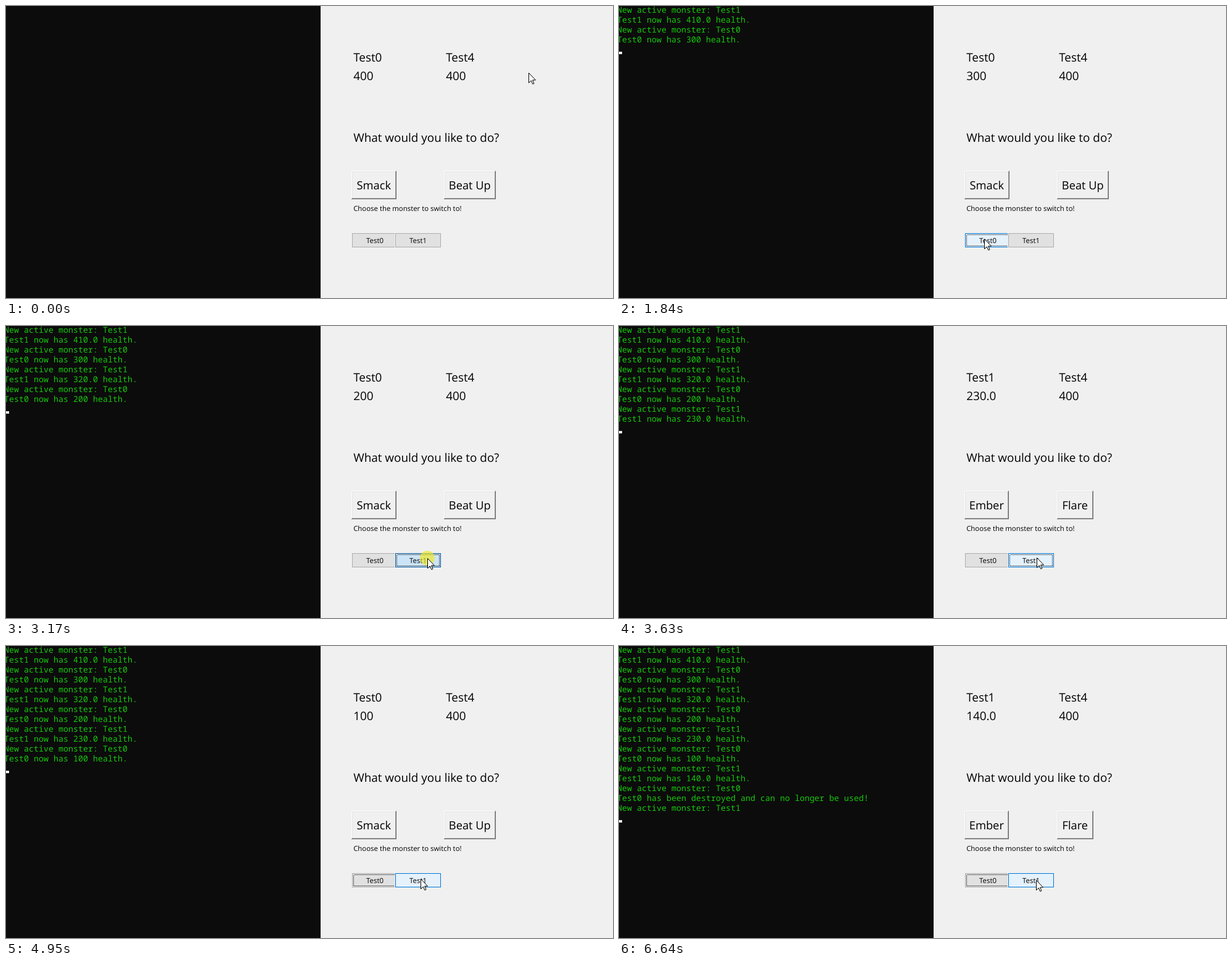
An HTML page for the animation above (8 s loop, 984 px wide and 473 px high).

```html
<!DOCTYPE html>
<html lang="en">
<head>
<meta charset="utf-8">
<title>Monster switch demo</title>
<style>
  html, body { margin: 0; width: 100%; height: 100%; overflow: hidden; background: #f0f0f0; }
  svg { display: block; width: 984px; height: 473px; }
  text { font-family: "Open Sans", "Noto Sans", sans-serif; text-rendering: geometricPrecision; white-space: pre; }
  rect { shape-rendering: crispEdges; }
  .label { font-size: 18.9px; }
  .move { font-size: 18.3px; text-anchor: middle; }
  .small { font-size: 11.4px; }
  .mid { text-anchor: middle; }
  #log text { font: 13.333px "Noto Sans Mono", "DejaVu Sans Mono", monospace; fill: #16c60c; }
  .face { fill: #e1e1e1; stroke: #adadad; }
  .hover .face { fill: #e5f1fb; stroke: #0078d7; }
  .pressed .face { fill: #cce4f7; stroke: #005499; }
  .ring { fill: none; stroke: #000; stroke-dasharray: 1; stroke-dashoffset: 1; visibility: hidden; }
  .focus .ring { visibility: visible; }
</style>
</head>
<body>
<svg viewBox="0 0 984 473">
  <rect width="984" height="473" fill="#f0f0f0"/>
  <rect width="510" height="473" fill="#0c0c0c"/>
  <g id="log"></g>
  <rect id="caret" width="5" height="4" fill="#f2f2f2"/>

  <text class="label" id="name" x="563.2" y="90"></text>
  <text class="label" id="hp" x="563.2" y="120"></text>
  <text class="label" x="713.2" y="90">Test4</text>
  <text class="label" x="713.2" y="120">400</text>
  <text class="label" x="563.2" y="220">What would you like to do?</text>
  <g id="moves"></g>
  <text class="small" x="563.2" y="332">Choose the monster to switch to!</text>
  <g id="switches"></g>

  <g id="mouse">
    <circle id="glow" r="12" fill="#eee81e" fill-opacity=".65"/>
    <path d="M.5 .5V16.5L4.3 12.9L6.8 18.5L9 17.5L6.6 12H11.5Z" fill="#fff" stroke="#000"/>
  </g>
</svg>
<script>
const LOOP = 8000;
const LEAD = 150;    // pointer rests this long before a press
const LINGER = 80;   // and this long after a release
const RETREAT = 80;  // a destroyed monster is swapped out after this

// Where the pointer stops: press time, release time, x, y.
// The first and last stops are only resting places.
const stops = [
  [0, 380, 847, 108],
  [1150, 1230, 659, 388],
  [1610, 1765, 592, 377],
  [2240, 2320, 664, 376],
  [2700, 2780, 598, 376],
  [3170, 3320, 683, 376],
  [4500, 4580, 625, 370],
  [5100, 5180, 672, 377],
  [5960, 6040, 606, 377],
  [6790, LOOP, 676, 379]
].map(([press, release, x, y]) => ({ press, release, x, y }));
const clicks = stops.slice(1, -1);

// Clicks alternate between the two monsters, each losing health per switch.
const targetOf = k => (k + 1) % 2;
const healthOf = k => targetOf(k) ? (410 - 45 * k).toFixed(1) : String(350 - 50 * k);

const moveNames = [['Smack', 'Beat Up'], ['Ember', 'Flare']];
const moveWidths = [[73, 84], [72, 59]];

const $ = id => document.getElementById(id);
const ease = f => f * f * f * (f * (6 * f - 15) + 10);
const clamp = f => Math.max(0, Math.min(1, f));

function add(parent, tag, attrs, text = '') {
  const el = document.createElementNS('http://www.w3.org/2000/svg', tag);
  for (const key in attrs) el.setAttribute(key, attrs[key]);
  el.textContent = text;
  return parent.appendChild(el);
}

const logRows = Array.from({ length: 2 * clicks.length + 1 }, (_, i) =>
  add($('log'), 'text', { x: -3, y: 11 + 16 * i }));

// Raised frame from nested rectangles; each one is a pixel smaller.
const bevel = ['#696969', '#fff', '#a0a0a0', '#e3e3e3', '#f0f0f0'];
const moveButtons = [560, 710].map(x => ({
  x,
  layers: bevel.map((fill, n) => {
    const inset = Math.floor(n / 2);
    return add($('moves'), 'rect', { x: x + inset, y: 267 + inset, height: 46 - n, fill });
  }),
  text: add($('moves'), 'text', { class: 'move', y: 297 })
}));

const switches = [561, 631].map((x, i) => {
  const g = add($('switches'), 'g', {});
  add(g, 'rect', { x: x - 1, y: 367, width: 76, height: 25, fill: '#f0f0f0' });
  add(g, 'rect', { class: 'face', x: x + .5, y: 368.5, width: 73, height: 22 });
  add(g, 'rect', { class: 'ring', x: x + 2.5, y: 370.5, width: 69, height: 18 });
  add(g, 'text', { class: 'small mid', x: x + 37, y: 384 }, 'Test' + i);
  return g;
});

function pointerAt(t) {
  const i = stops.findIndex(s => t < s.release + LINGER);
  const to = stops[i], from = stops[i - 1] || to;
  const depart = from.release + LINGER;
  const f = ease(clamp((t - depart) / (to.press - LEAD - depart)));
  return ['x', 'y'].map(axis => Math.round(from[axis] + (to[axis] - from[axis]) * f));
}

function battleAt(t) {
  const state = { active: 0, health: '400', lines: [] };
  const enter = k => {
    state.active = targetOf(k);
    state.health = healthOf(k);
    state.lines.push(`New active monster: Test${state.active}`);
  };
  clicks.forEach(({ release }, k) => {
    if (t < release) return;
    enter(k);
    const { active, health, lines } = state;
    const dead = Number(health) <= 0;
    lines.push(`Test${active} ` + (dead
      ? 'has been destroyed and can no longer be used!'
      : `now has ${health} health.`));
    if (dead && t >= release + RETREAT) enter(k - 1);
  });
  return state;
}

function drawBattle(t) {
  const { active, health, lines } = battleAt(t);
  logRows.forEach((row, i) => row.textContent = lines[i] || '');
  $('caret').setAttribute('y', 10 + 16 * lines.length);
  $('caret').setAttribute('visibility', lines.length ? 'visible' : 'hidden');
  $('name').textContent = 'Test' + active;
  $('hp').textContent = health;
  moveButtons.forEach(({ x, layers, text }, i) => {
    const width = moveWidths[active][i];
    layers.forEach((layer, n) => layer.setAttribute('width', width - n));
    text.setAttribute('x', x + width / 2 - .2);
    text.textContent = moveNames[active][i];
  });
}

function drawPointer(t) {
  const [x, y] = pointerAt(t);
  const inRow = y >= 368 && y < 391 && x >= 561 && x < 705;
  const over = inRow ? Number(x >= 631) : -1;
  const last = clicks.filter(c => c.press <= t).length - 1;
  const focused = last < 0 ? -1 : targetOf(last);
  const down = last >= 0 && t < clicks[last].release;
  switches.forEach((g, i) => {
    g.classList.toggle('hover', over === i);
    g.classList.toggle('pressed', down && focused === i);
    g.classList.toggle('focus', focused === i);
  });
  $('mouse').setAttribute('transform', `translate(${x} ${y})`);
  $('glow').setAttribute('visibility', down ? 'visible' : 'hidden');
}

const begin = performance.now();
function tick() {
  const t = (performance.now() - begin) % LOOP;
  drawBattle(t);
  drawPointer(t);
  requestAnimationFrame(tick);
}
tick();
</script>
</body>
</html>
```
